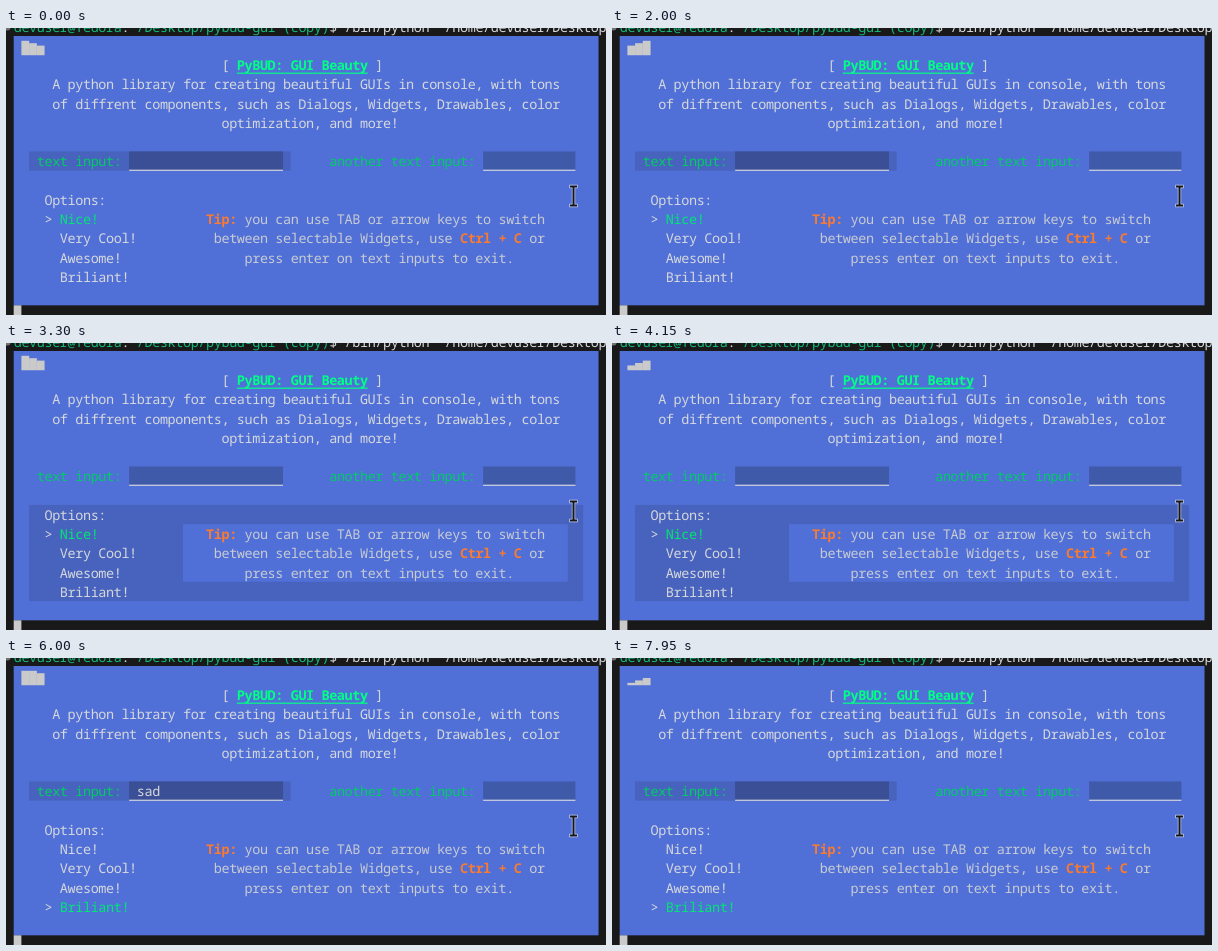
Write an HTML page that moves like this. It is 600x287 px and loops after 8 s.

```html
<!DOCTYPE html>
<html lang="en">
<head>
<meta charset="utf-8">
<title>Console GUI</title>
<style>
  html, body { margin: 0; width: 100%; height: 100%; overflow: hidden; background: #191919; }
  svg { display: block; width: 600px; height: 287px; }
  text {
    font: 13.47px "Noto Sans Mono", "DejaVu Sans Mono", monospace;
    letter-spacing: calc(7.695px - 0.6em); /* terminal cells are narrower than the advance */
    text-rendering: geometricPrecision;
    white-space: pre;
    fill: #d6d8dc;
  }
  .tip { fill: #c8cbd2; }
  .label { fill: #00cc66; }
  .path { fill: #12b879; }
  .title { fill: #00ff85; font-weight: 700; }
  .key { fill: #f97a30; font-weight: 600; }
  .picked { fill: #00e673; }
  .panel { fill: #5070d8; }
  .focus { fill: #4863bd; }
  .field { fill: #405aaa; }
  .field.on { fill: #3b4f96; }
  .rule { fill: #e0e2e6; }
  .block { fill: #cacaca; }
</style>
</head>
<body>
<svg id="stage" viewBox="0 0 600 287"></svg>
<script>
  const CELL = 7.695, ROW = CELL * 2.5, TOP = 8, BASE = 15, LOOP = 8000;
  const stage = document.getElementById('stage');
  const colX = c => c * CELL;
  const rowY = r => TOP + r * ROW;

  function add(tag, attrs, content = '') {
    const el = document.createElementNS('http://www.w3.org/2000/svg', tag);
    for (const name in attrs) el.setAttribute(name, attrs[name]);
    el.textContent = content;
    return stage.appendChild(el);
  }

  const rect = (cls, x, y, width, height) => add('rect', { class: cls, x, y, width, height });
  const cells = (cls, col, row, cols, rows = 1) =>
    rect(cls, colX(col), rowY(row), cols * CELL, rows * ROW);
  const write = (col, row, str, cls = '') =>
    add('text', { class: cls, x: colX(col), y: rowY(row) + BASE }, str);

  // Shell prompt and panel
  add('circle', { class: 'block', cx: 1.5, cy: -0.5, r: 3, opacity: 0.5 });
  write(1, -1, 'devuser@fedora', 'path');
  write(15, -1, ':');
  write(16, -1, '~/Desktop/pybud-gui (copy)', 'path');
  write(42, -1, '$ /bin/python "/home/devuser/Desktop/');
  cells('panel', 1, 0, 76, 14);
  cells('block', 1, 14, 1);

  // Focus highlights
  const focusBoxes = [
    [cells('focus', 3, 6, 34)],
    [cells('focus', 41, 6, 34)],
    [cells('focus', 3, 8, 72, 5), cells('panel', 23, 9, 50, 3)]
  ];

  // Heading
  write(28, 1, '[');
  write(30, 1, 'PyBUD: GUI Beauty', 'title');
  rect('title', colX(30), 44.6, 17 * CELL, 1.2);
  write(48, 1, ']');
  write(6, 2, 'A python library for creating beautiful GUIs in console, with tons');
  write(6, 3, 'of diffrent components, such as Dialogs, Widgets, Drawables, color');
  write(28, 4, 'optimization, and more!');

  // Text inputs
  function input(labelCol, label, col, cols) {
    write(labelCol, 6, label, 'label');
    const field = cells('field', col, 6, cols);
    rect('rule', colX(col), 141.7, cols * CELL, 1.1);
    return field;
  }
  const fields = [
    input(4, 'text input:', 16, 20),
    input(42, 'another text input:', 62, 12)
  ];
  const typed = write(17, 6, '');

  // Options
  write(5, 8, 'Options:');
  const options = ['Nice!', 'Very Cool!', 'Awesome!', 'Briliant!']
    .map((name, i) => write(7, 9 + i, name));
  const arrow = write(5, 9, '>');

  // Tip
  write(26, 9, 'Tip:', 'key');
  write(31, 9, 'you can use TAB or arrow keys to switch', 'tip');
  write(27, 10, 'between selectable Widgets, use', 'tip');
  write(59, 10, 'Ctrl + C', 'key');
  write(68, 10, 'or', 'tip');
  write(31, 11, 'press enter on text inputs to exit.', 'tip');

  const bars = [2, 3, 4].map(col => rect('block', colX(col), 0, CELL + 0.1, 0));

  // Mouse pointer
  const beam = 'M565 158.5H570M567.5 158.5V177.5M565 177.5H570';
  add('path', { d: beam, fill: 'none', stroke: '#c8d0ea', 'stroke-width': 3.4, 'stroke-linecap': 'square' });
  add('path', { d: beam, fill: 'none', stroke: '#15171c', 'stroke-width': 2, 'stroke-linecap': 'square' });

  // Each track lists [start time, value]
  const focusTrack = [[0, 0], [2350, 1], [3000, 2], [4950, 0]];
  const pickTrack = [[0, 0], [4450, 1], [4600, 2], [4750, 3]];
  const typeTrack = [[0, ''], [5450, 's'], [5600, 'sa'], [5800, 'sad'],
    [6900, 'sa'], [7050, 's'], [7200, '']];
  const valueAt = (track, t) => track.filter(step => step[0] <= t).pop()[1];

  // Neighbouring bars follow one flat-topped wave
  function drawBars(t) {
    const step = Math.floor(t * 12 / 550 + 7.4);
    bars.forEach((bar, i) => {
      const level = Math.min(6, 7 - Math.abs((step + i) % 12 - 6));
      const height = level * ROW / 8;
      bar.setAttribute('y', rowY(1) - height);
      bar.setAttribute('height', height);
    });
  }

  function draw(t) {
    const focus = valueAt(focusTrack, t);
    const pick = valueAt(pickTrack, t);
    focusBoxes.forEach((boxes, i) => boxes.forEach(box =>
      box.setAttribute('visibility', i === focus ? 'visible' : 'hidden')));
    fields.forEach((field, i) => field.classList.toggle('on', i === focus));
    options.forEach((option, i) => option.classList.toggle('picked', i === pick));
    arrow.setAttribute('y', rowY(9 + pick) + BASE);
    typed.textContent = valueAt(typeTrack, t);
    drawBars(t);
  }

  const start = performance.now();
  function tick() {
    draw((performance.now() - start) % LOOP);
    requestAnimationFrame(tick);
  }
  tick();
</script>
</body>
</html>
```
